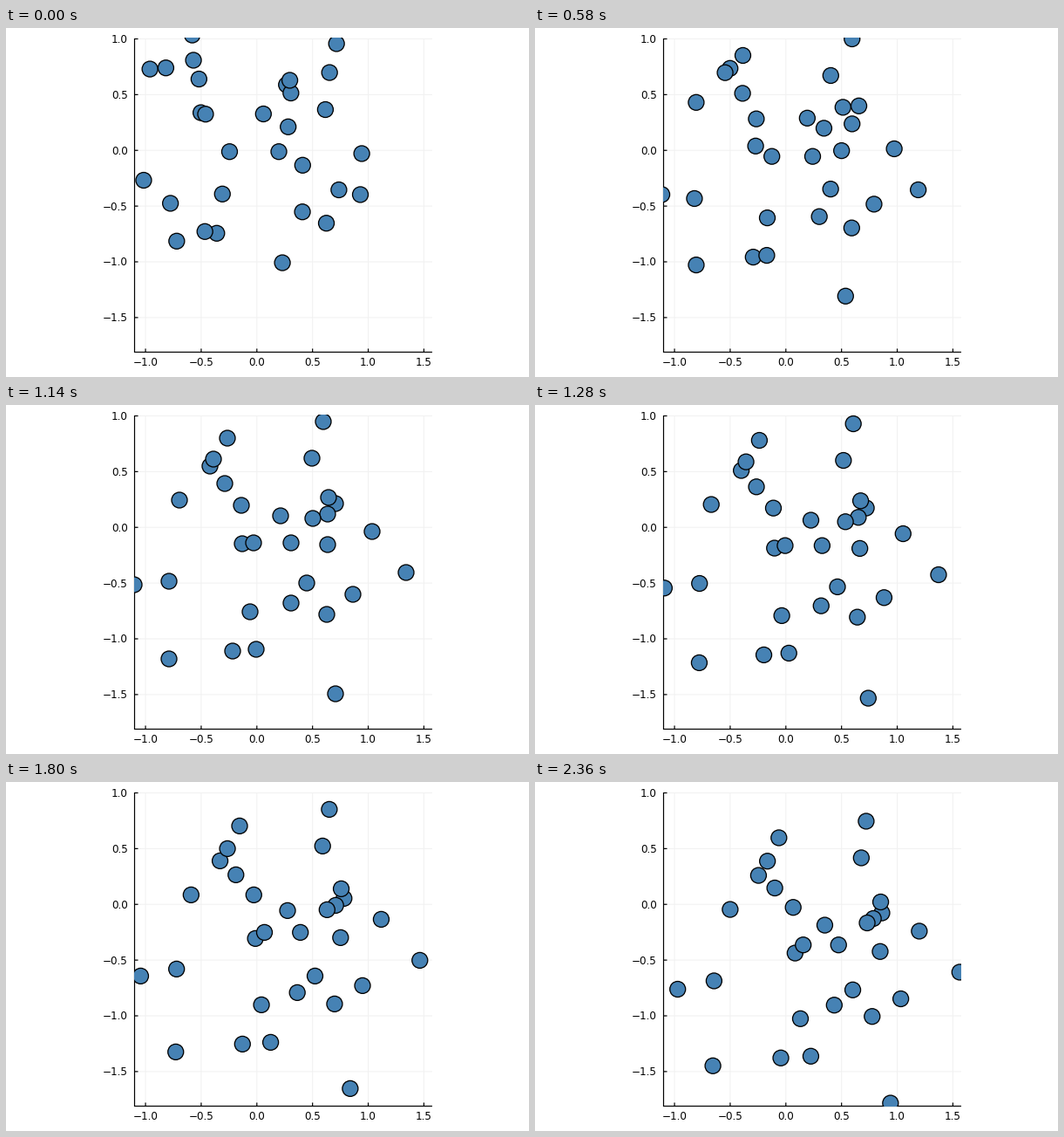
A matplotlib script that plays this animation: 600x400 px, repeating every 2460 ms.

```python
import numpy as np
import matplotlib.pyplot as plt
from matplotlib.animation import FuncAnimation
from matplotlib.patches import Circle, Rectangle

DPI = 100
PX = 72 / DPI                 # points per pixel
UNIT = 127.75                 # pixels per data unit
X0, Y0 = 287.8, 140.25        # pixel position of the data origin
LEFT, TOP, RIGHT, BOTTOM = 147, 11, 489, 372

STEPS, KEY_STEP = 50, 25
DRIFT = np.array([0.915, 1.26])   # shared velocity, pixels per step
FRICTION = 0.068                  # decay of each particle's own velocity

# Where the particles are halfway, sorted by their own velocity:
# downward to upward by row, leftward to rightward within a row.
HALFWAY = np.array([
    [(315, 127), (378, 113), (234, 70), (199, 109), (271, 159), (378, 331)],
    [(187, 291), (345, 204), (260, 282), (280, 237), (369, 160), (287, 280)],
    [(147, 206), (369, 125), (398, 217), (251, 90), (370, 106), (352, 130)],
    [(327, 227), (368, 240), (327, 158), (284, 158), (270, 115), (238, 62)],
    [(364, 19), (187, 202), (420, 145), (351, 61), (254, 38), (459, 192)],
])


def own_travel():
    """Own displacement over the loop: an even, slightly sheared grid."""
    row, col = np.mgrid[2:-3:-1, -2.5:3]
    return np.stack([16 * col + 2.5 * row, 18 * row], axis=-1)


TRAVEL = own_travel()


def eased(step):
    return (1 - np.exp(-FRICTION * step)) / (1 - np.exp(-FRICTION * STEPS))


def positions(step):
    """Own motion dies out until all particles drift together."""
    places = (HALFWAY + DRIFT * (step - KEY_STEP)
              + TRAVEL * (eased(step) - eased(KEY_STEP)))
    return places.reshape(-1, 2)


def step_at(ms):
    """Steps last 20, 100 and 20 ms in turn; the last one is held."""
    cycle, rest = divmod(ms, 140)
    return min(3 * cycle + (rest >= 20) + (rest >= 120), STEPS)


fig = plt.figure(figsize=(6, 4), dpi=DPI, facecolor="white")
ax = fig.add_axes([0, 0, 1, 1])
ax.set_xlim(0, 600)
ax.set_ylim(400, 0)
ax.axis("off")


def line(xs, ys, color="black", width=1.2, z=2):
    ax.plot(xs, ys, color=color, lw=width * PX, zorder=z,
            solid_capstyle="butt", snap=False)


def label(x, y, value, align):
    text = f"{value:.1f}".replace("-", "\u2212")
    ax.text(x, y, text, ha=align, va="baseline", fontsize=12 * PX,
            family="DejaVu Sans", color="black")


for value in np.arange(-1, 1.6, 0.5):
    x = X0 + value * UNIT
    line([x, x], [12, 371.5], "#f1f1f1", 1, 1)
    line([x, x], [367.5, 371.5])
    label(x, 387, value, "center")

for value in np.arange(-1.5, 1.1, 0.5):
    y = Y0 - value * UNIT
    line([147.5, RIGHT], [y, y], "#f1f1f1", 1, 1)
    line([147.5, 151.5], [y, y])
    label(139.7, y + 4.4, value, "right")

line([147.5, 147.5], [12, 372])
line([147, RIGHT], [371.5, 371.5])

window = Rectangle((LEFT, TOP), RIGHT - LEFT, BOTTOM - TOP,
                   transform=ax.transData)
dots = []
for place in positions(0):
    dot = Circle(place, 9, facecolor="steelblue", edgecolor="black",
                 lw=1.3 * PX, zorder=3)
    ax.add_patch(dot)
    dot.set_clip_path(window)
    dots.append(dot)


def update(frame):
    for dot, place in zip(dots, positions(step_at(frame * 20))):
        dot.center = place
    return dots


anim = FuncAnimation(fig, update, frames=123, interval=20, repeat=True,
                     repeat_delay=0, blit=False)
plt.show()
```
